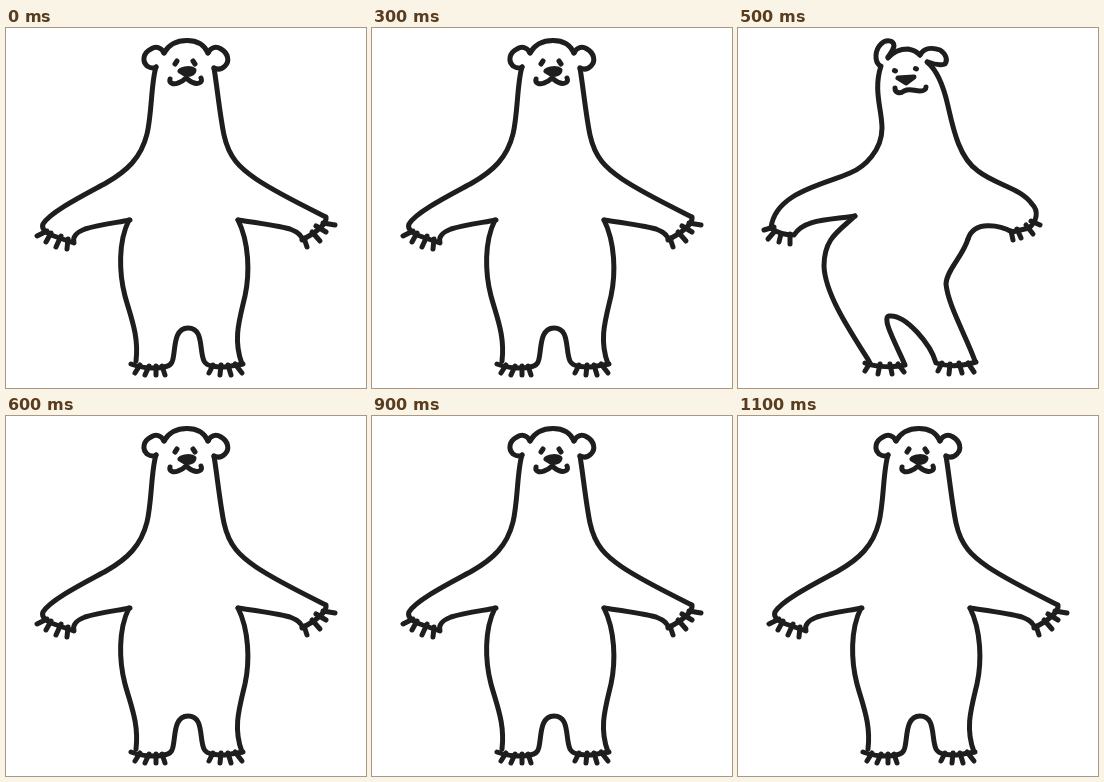
An HTML page with a canvas for the animation above (1.2 s loop, 360 px wide and 360 px high).

```html
<!DOCTYPE html>
<html lang="en">
<head>
<meta charset="utf-8">
<title>Dancing bear</title>
<style>
  html, body { margin: 0; width: 100%; height: 100%; overflow: hidden; background: #fff; }
  canvas { display: block; width: 360px; height: 360px; }
</style>
</head>
<body>
<canvas id="stage" width="360" height="360"></canvas>
<script>
const ctx = document.getElementById('stage').getContext('2d');
const INK = '#1f1e1f';
const STEP = 100;

const stand = {
  ears: 'M158 25C155 19 150 18 145 21C137 25 136 33 141 38C144 40 147 41 150 39' +
        'M202 25C205 19 210 18 215 21C222 25 224 33 219 38C216 41 212 42 208 40',
  head: 'M158 25C163 16 172 12.5 181 12.5C190 12.5 198 16 202 25',
  leftArm: 'M150 39C145 55 146 85 141 106C135 130 121 143 100 155C78 167 44 184 37 196' +
           'C35 201 39 204 45 207L68 215C66 209 71 204 79 201C92 197 108 195 124 192',
  rightArm: 'M208 40C211 58 214 88 218 107C223 130 234 140 250 151C271 165 300 179 320 189' +
            'C321 195 314 200 308 205L296 212C296 207 292 204 284 201C270 197 245 194 232 192',
  sides: 'M123 192C112 214 113 245 119 268C125 290 133 308 130 333' +
         'M232 192C243 214 244 245 239 268C233 293 227 312 236 336',
  legs: 'M125 336C133 339 139 340 146 340C157 340 164 339 166 334' +
        'C170 326 166 300 182 300C198 300 193 322 198 333C201 339 210 339 219 339L237 336',
  handClaws: 'M41 203L31 208M45 205L40 214M55 208L50 219M62 211L61 221' +
             'M317 195L329 197M310 198L320 204M306 204L314 213M298 210L301 219',
  footClaws: 'M134 337L129 345M143 338L139 347M150 338L150 347M156 338L159 347' +
             'M207 337L203 345M215 337L214 347M222 337L225 347M229 336L236 345',
  face: 'M171 33L169 36M187 33L189 36' +
        'M164 51C163 55 167 57 172 55C176 54 178 52 180 50C183 52 187 57 193 55C196 54 196 52 195 50',
  nose: 'M174 43C177 40 185 40 188 42C188 46 182 47 179 46Z',
  solidNose: true
};

const leanRight = {
  ears: 'M171 36C165 42 158 43 153 40C147 35 149 28 156 24C164 21 171 23 175 28' +
        'M215 28C212 21 215 16 220 16C227 16 232 23 231 31C230 35 228 38 223 38',
  head: 'M175 28C182 19 196 18 205 21C210 23 213 25 215 28',
  leftArm: 'M171 36C164 55 161 88 150 112C139 137 115 148 92 157C65 166 51 178 53 207' +
           'C57 209 70 210 77 211C83 197 98 186 131 185',
  rightArm: 'M224 37C230 56 229 82 224 105C221 120 219 126 229 132C246 143 285 147 308 164' +
            'C313 168 317 174 318 181C318 187 311 192 296 197C291 197 285 195 276 190C262 184 239 178 229 187',
  sides: 'M131 181C127 187 128 205 132 219C139 236 151 246 149 257C145 275 124 305 124 327' +
         'M238 184C245 204 273 205 274 238C274 268 245 305 237 334',
  legs: 'M123 337C135 339 150 339 164 333C175 317 195 290 208 290C220 291 206 318 199 334C210 339 225 339 237 336',
  handClaws: 'M53 206L42 210M58 208L52 215M67 209L63 217M74 211L75 220' +
             'M313 177L326 180M312 183L320 191M304 187L311 198M295 191L299 203',
  footClaws: 'M129 334L123 343M139 335L135 346M147 335L147 346M155 333L160 345' +
             'M205 335L201 343M213 336L210 346M219 336L220 346M225 336L228 346M231 335L236 344',
  face: 'M182 40.5L183 41M205 40.5L206 41' +
        'M176 57C174 62 177 64 182 62C189 60 192 61 198 63C205 65 208 62 207 57',
  nose: 'M187 47L204 47L196 55Z'
};

const leanLeft = {
  ears: 'M142 38C136 33 137 22 143 16C148 11 156 12 156 18C155 23 152 26 150 29' +
        'M182 27C186 20 194 19 202 22C208 26 210 32 207 36C201 38 195 36 190 34',
  head: 'M150 30C155 24 162 21 170 21C176 22 179 24 182 27',
  leftArm: 'M143 38C135 62 144 82 144 100C144 122 127 139 112 145C88 156 37 164 33 200' +
           'C38 204 46 207 56 207C66 191 90 192 117 188',
  rightArm: 'M189 34C199 42 206 60 210 78C215 100 221 130 240 143C258 157 283 160 294 176' +
            'C301 183 299 193 291 200L274 204C262 197 236 192 230 211',
  sides: 'M117 188C101 203 86 210 86 238C87 266 112 303 131 333' +
         'M230 211C225 228 208 243 208 256C210 277 228 308 237 333',
  legs: 'M127 335C137 339 155 340 167 337C159 318 143 290 151 288C168 286 193 317 198 335C210 339 225 338 238 334',
  handClaws: 'M36 199L26 202M37 203L30 211M43 206L41 214M52 206L52 216' +
             'M293 193L302 197M288 197L295 206M279 201L283 210M273 203L275 212',
  footClaws: 'M132 335L127 343M142 336L140 346M152 336L154 346M160 336L166 344' +
             'M204 335L200 343M212 336L211 346M221 335L224 345M230 335L236 344',
  face: 'M156.5 42.5L157.5 43M177.5 40.5L178.5 41' +
        'M157 60C157 65 162 66 166 63C172 60 176 63 182 63C186 63 188 61 188 59',
  nose: 'M160 50L176 49L168 55Z'
};

function build({ nose, solidNose, ...parts }) {
  return {
    lines: Object.values(parts).map(d => new Path2D(d)),
    nose: new Path2D(nose),
    solidNose
  };
}

const A = build(stand), R = build(leanRight), L = build(leanLeft);
const dance = [A, L, R, A, R, L, A, L, R, A, R, A];

function draw(pose) {
  ctx.fillStyle = '#fff';
  ctx.fillRect(0, 0, 360, 360);
  ctx.strokeStyle = ctx.fillStyle = INK;
  ctx.lineCap = ctx.lineJoin = 'round';
  ctx.lineWidth = 5;
  pose.lines.forEach(p => ctx.stroke(p));
  ctx.stroke(pose.nose);
  if (pose.solidNose) ctx.fill(pose.nose);
}

const start = performance.now();
function tick() {
  const t = performance.now() - start;
  draw(dance[Math.floor(t / STEP) % dance.length]);
  requestAnimationFrame(tick);
}
tick();
</script>
</body>
</html>
```
